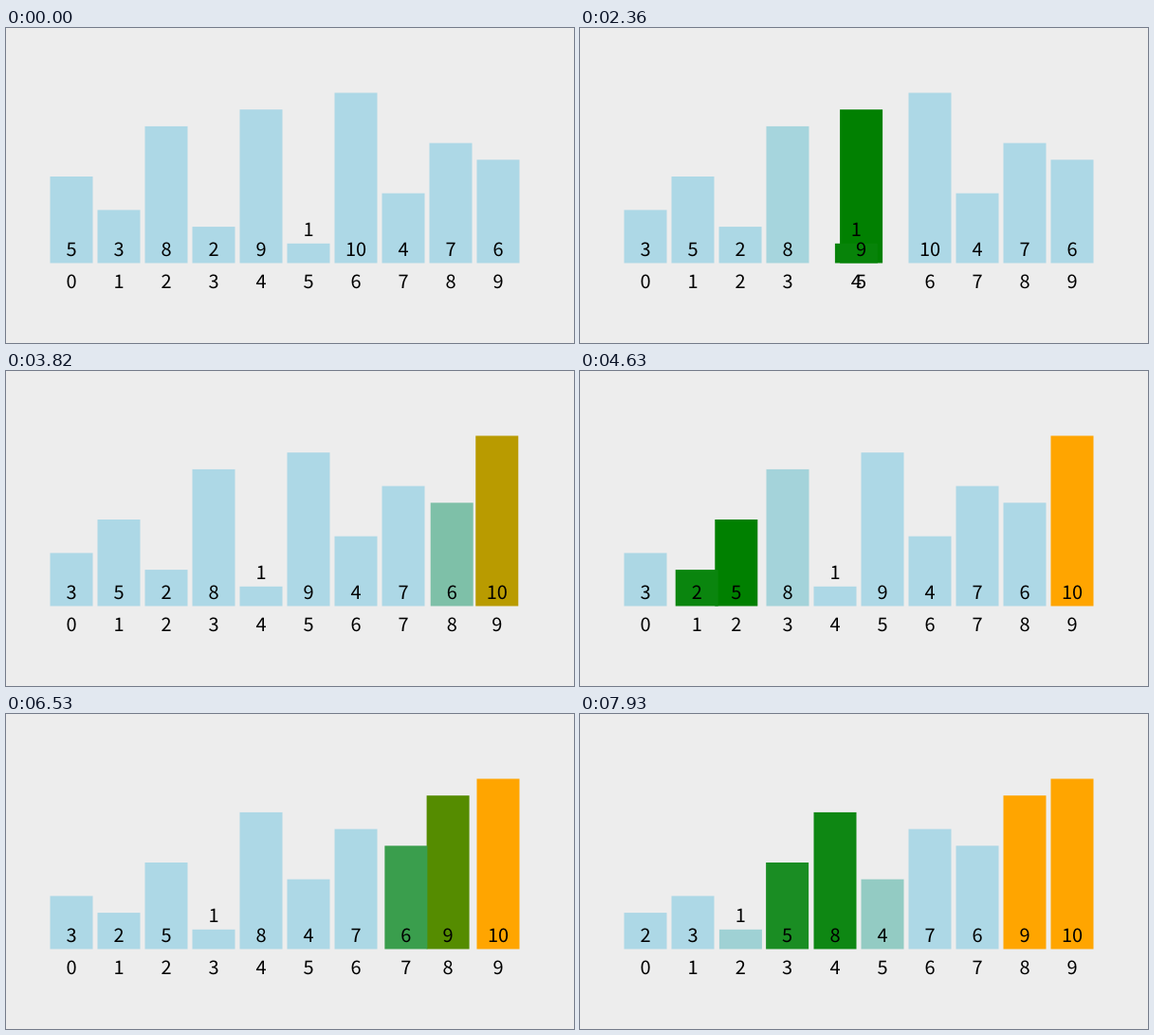
Recreate the animation shown at these times as an HTML page. Size 599 by 333 pixels, loop 7990 ms.

```html
<!DOCTYPE html>
<html lang="en">
<head>
<meta charset="utf-8">
<title>Bubble sort</title>
<style>
  html, body { margin: 0; width: 100%; height: 100%; overflow: hidden; background: #ededed; }
  svg { display: block; width: 599px; height: 333px; }
  text {
    font: 20px "Noto Sans CJK SC", "Noto Sans CJK JP", "Noto Sans CJK", "Lato", sans-serif;
    text-anchor: middle;
    text-rendering: geometricPrecision;
  }
</style>
</head>
<body>
<svg id="stage" viewBox="0 0 599 333"></svg>
<script>
const LOOP = 7990;
const FADE = 250; // longer than one step, so each step cuts the previous move short
const VALUES = [5, 3, 8, 2, 9, 1, 10, 4, 7, 6];
const BLUE = [173, 216, 230], GREEN = [0, 128, 0], ORANGE = [255, 165, 0];

// [step, start in ms]; steps between are evenly spaced
const BEATS = [[0, 970], [2, 1329], [12, 3134], [20, 4572], [26, 5700], [30, 6422], [38, 7847], [40, 8207]];

const mix = (a, b, p) => a + (b - a) * p;
const ease = p => p >= 1 ? 1 : p < 0.5 ? 4 * p ** 3 : 1 - 4 * (1 - p) ** 3;
const slotX = i => 69 + 50 * i;

function startOf(step) {
  const n = BEATS.findIndex(b => b[0] > step);
  const [s0, t0] = BEATS[n - 1], [s1, t1] = BEATS[n];
  return mix(t0, t1, (step - s0) / (s1 - s0));
}

// Bubble sort as a list of { slots, colors } per bar
function buildSteps() {
  const order = VALUES.map((_, i) => i);
  const done = new Set();
  const steps = [];
  const push = (...active) => {
    const slots = [];
    order.forEach((bar, i) => slots[bar] = i);
    const colors = VALUES.map((_, bar) =>
      done.has(bar) ? ORANGE : active.includes(slots[bar]) ? GREEN : BLUE);
    steps.push({ slots, colors });
  };
  for (let end = 9; end > 6; end--) {
    for (let i = 0; i < end; i++) {
      push(i, i + 1);
      if (VALUES[order[i]] > VALUES[order[i + 1]]) {
        [order[i], order[i + 1]] = [order[i + 1], order[i]];
        push(i, i + 1);
      }
    }
    done.add(order[end]);
    push(); // mark the sorted bar
    push(); // begin the next pass
  }
  const last = BEATS[BEATS.length - 1][0];
  return steps.slice(0, last - 1).map((s, k) => ({ ...s, start: startOf(k), stop: startOf(k + 1) }));
}

const stage = document.getElementById("stage");
function add(tag, attrs, content = "") {
  const el = document.createElementNS("http://www.w3.org/2000/svg", tag);
  for (const name in attrs) el.setAttribute(name, attrs[name]);
  el.textContent = content;
  return stage.appendChild(el);
}

const rects = VALUES.map(v => {
  const height = 3 + 17.7 * v;
  return add("rect", { y: 248.5 - height, width: 45, height });
});
const numbers = VALUES.map(v => add("text", { y: v === 1 ? 219.8 : 240.5 }, v));
const labels = VALUES.map((_, i) => add("text", { y: 274.6 }, i));
const steps = buildSteps();

function draw(time) {
  const xs = VALUES.map((_, i) => slotX(i));
  const fills = VALUES.map(() => BLUE);
  let slots = VALUES.map((_, i) => i);
  for (const step of steps) {
    if (step.start > time) break;
    const p = ease((Math.min(time, step.stop) - step.start) / FADE);
    slots = step.slots;
    for (let i = 0; i < xs.length; i++) {
      xs[i] = mix(xs[i], slotX(slots[i]), p);
      fills[i] = fills[i].map((c, n) => mix(c, step.colors[i][n], p));
    }
  }
  xs.forEach((x, i) => {
    rects[i].setAttribute("x", x - 22.5);
    rects[i].setAttribute("fill", `rgb(${fills[i].map(Math.round)})`);
    numbers[i].setAttribute("x", x);
    labels[i].setAttribute("x", x);
    labels[i].textContent = slots[i];
  });
}

const origin = performance.now();
function tick() {
  draw((performance.now() - origin) % LOOP);
  requestAnimationFrame(tick);
}
tick();
</script>
</body>
</html>
```
